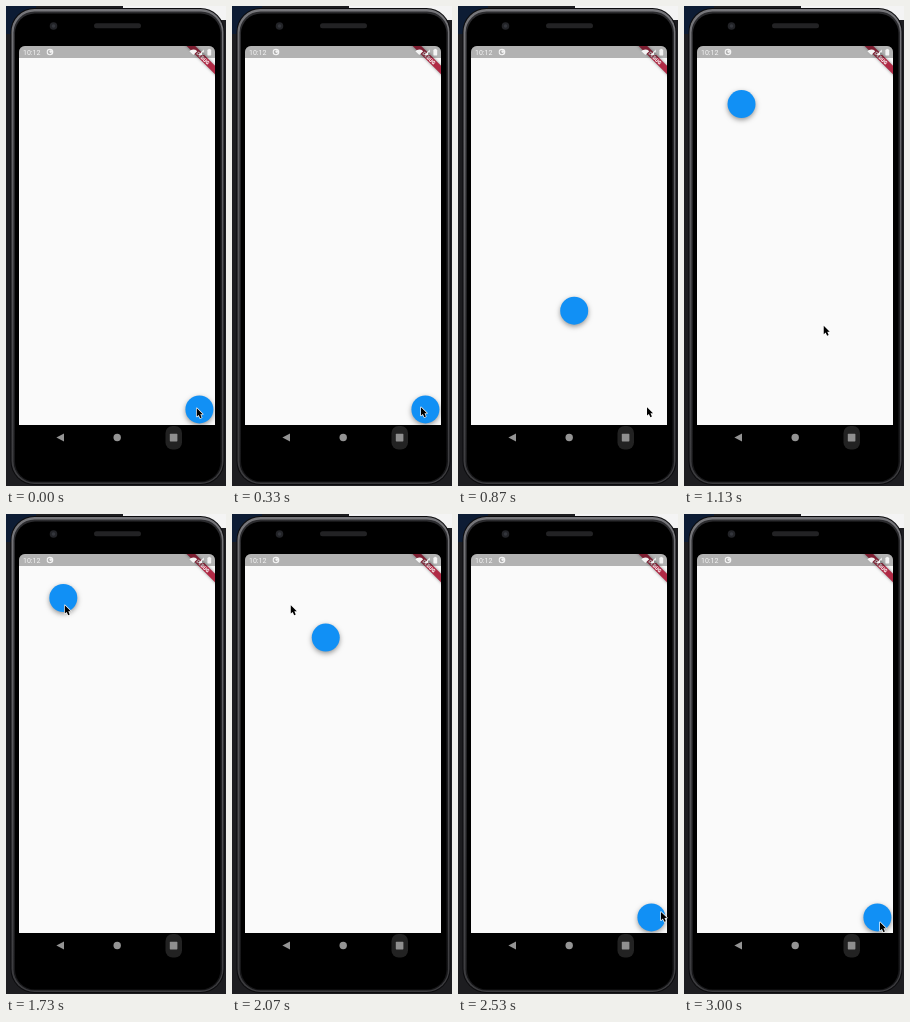
These frames come from a looping animation (220x480 px, 3.07 s). An HTML page with a canvas:

```html
<!DOCTYPE html>
<html lang="en">
<head>
<meta charset="utf-8">
<title>Moving button</title>
<style>
html, body { margin: 0; width: 100%; height: 100%; overflow: hidden; background: #000; }
canvas { display: block; width: 220px; height: 480px; }
</style>
</head>
<body>
<canvas id="stage" width="220" height="480"></canvas>
<script>
const ctx = document.getElementById('stage').getContext('2d');
const LOOP = 3070, TICK = 200 / 3;
const HOME = { x: 193.4, y: 403.4 }, AWAY = { x: 57.3, y: 84 };
const REST = { x: 190.3, y: 402 };

// Pointer moves, each from where the last one ended
const MOVES = [
  { start: 67, dur: 266, x: 188.5, y: 401, bend: 0 },
  { start: 1050, dur: 550, x: 58.3, y: 91, bend: 18 },
  { start: 2133, dur: 540, x: 212, y: 420, bend: 4 },
  { start: 2690, dur: 310, x: 195.5, y: 408, bend: 0 }
];

const progress = (ms, start, dur) => Math.min(1, Math.max(0, (ms - start) / dur));
const easeInOut = u => (1 - Math.cos(Math.PI * u)) / 2;
const easeOut = u => u * (2 - u);

// Circular arc that arrives at b vertically
function arc(a, b, t) {
  const dx = a.x - b.x, dy = a.y - b.y;
  const r = (dx * dx + dy * dy) / Math.abs(dx) / 2;
  const ang = Math.asin(Math.abs(dy) / r) * (1 - t);
  return {
    x: b.x + Math.sign(dx) * r * (1 - Math.cos(ang)),
    y: b.y + Math.sign(dy) * r * Math.sin(ang)
  };
}

function buttonAt(ms) {
  return ms < 1600
    ? arc(HOME, AWAY, easeInOut(progress(ms, 636, 570)))
    : arc(AWAY, HOME, easeInOut(progress(ms, 1910, 617)));
}

function pointerAt(ms) {
  let p = REST;
  for (const m of MOVES) {
    if (ms <= m.start) break;
    const e = easeOut(progress(ms, m.start, m.dur));
    const dx = m.x - p.x, dy = m.y - p.y;
    const side = m.bend * Math.sin(Math.PI * e) / Math.hypot(dx, dy);
    p = { x: p.x + dx * e + dy * side, y: p.y + dy * e - dx * side };
  }
  return p;
}

function rect(x, y, w, h, fill) {
  ctx.fillStyle = fill;
  ctx.fillRect(x, y, w, h);
}
function round(x, y, w, h, r, fill) {
  ctx.beginPath();
  ctx.roundRect(x, y, w, h, r);
  ctx.fillStyle = fill;
  ctx.fill();
}
function disc(x, y, r, fill) {
  ctx.beginPath();
  ctx.arc(x, y, r, 0, Math.PI * 2);
  ctx.fillStyle = fill;
  ctx.fill();
}
function poly(points, fill) {
  ctx.beginPath();
  points.forEach(p => ctx.lineTo(p[0], p[1]));
  ctx.closePath();
  ctx.fillStyle = fill;
  ctx.fill();
}
function fade(from, to) {
  const g = ctx.createLinearGradient(0, 0, 0, 480);
  g.addColorStop(0, from);
  g.addColorStop(1, to);
  return g;
}

function phone() {
  rect(0, 0, 220, 480, '#1d1d20');
  rect(0, 0, 30, 28, '#0d1c34');
  rect(117, 0, 103, 2, '#f4f4f4');
  rect(190, 0, 30, 14, '#f4f4f4');
  round(4.5, 2, 214, 477, 24, '#0b0b0d');
  round(5.5, 3, 212, 475, 23, fade('#77777b', '#3a3a3d'));
  round(7.5, 5.5, 208.5, 471, 21, fade('#2c2c2f', '#161618'));
  round(9, 7.5, 205.5, 468, 20, '#000');
  disc(47.5, 20, 3.8, '#222327');
  disc(47.5, 20, 1.8, '#34363c');
  round(88, 17.3, 47, 5, 2.5, '#222224');
}

function banner() {
  ctx.save();
  ctx.translate(209, 40);
  ctx.rotate(Math.PI / 4);
  ctx.shadowColor = 'rgba(0,0,0,.45)';
  ctx.shadowBlur = 3;
  rect(-40, 14, 80, 6, '#b02a45');
  ctx.shadowColor = 'transparent';
  ctx.fillStyle = '#fff';
  ctx.font = '900 5px Roboto, sans-serif';
  ctx.textAlign = 'center';
  ctx.fillText('DEBUG', 0, 18.8);
  ctx.restore();
}

function statusIcons() {
  const white = '#f4f4f4';
  ctx.fillStyle = white;
  ctx.font = '7px Roboto, sans-serif';
  ctx.textAlign = 'left';
  ctx.fillText('10:12', 17, 48.7);
  disc(44, 46, 3.3, white);
  disc(43.8, 46.1, 2.1, '#b0b0b0');
  disc(44.7, 45.6, 1.3, white);
  ctx.beginPath();
  ctx.moveTo(187.3, 49);
  ctx.arc(187.3, 49, 5.4, -Math.PI * .76, -Math.PI * .24);
  ctx.fillStyle = white;
  ctx.fill();
  poly([[192.5, 49], [197.8, 49], [197.8, 43.4]], white);
  rect(196, 46.5, 2, 2.5, '#8d8d8d');
  round(201.4, 43.6, 3.8, 5.8, .6, white);
  rect(202.4, 42.9, 1.8, 1, white);
}

function navBar() {
  round(159.5, 420, 16.5, 23.5, 7, '#222');
  poly([[50.4, 431.5], [58, 427.4], [58, 435.6]], '#949494');
  disc(111.2, 431.5, 3.7, '#949494');
  round(163.8, 427.8, 7.6, 7.6, .6, '#8f8f8f');
}

function screen() {
  ctx.save();
  ctx.beginPath();
  ctx.roundRect(13, 40, 196, 379, [6, 6, 0, 0]);
  ctx.clip();
  rect(13, 40, 196, 379, '#fafafa');
  banner();
  rect(13, 40, 196, 12, 'rgba(0,0,0,.29)');
  statusIcons();
  ctx.restore();
  navBar();
}

function button(ms) {
  const p = buttonAt(ms);
  ctx.save();
  ctx.shadowColor = 'rgba(0,0,0,.4)';
  ctx.shadowBlur = 5;
  ctx.shadowOffsetY = 2;
  disc(p.x, p.y, 14, '#1190f5');
  ctx.restore();
}

function pointer(ms) {
  const p = pointerAt(ms);
  ctx.save();
  ctx.translate(p.x, p.y);
  ctx.lineJoin = 'round';
  ctx.strokeStyle = '#fff';
  ctx.lineWidth = 1.3;
  const tip = [[.5, .3], [.5, 8.6], [2.4, 6.9], [3.9, 10.2], [5.4, 9.5], [4, 6.3], [6.5, 6.2]];
  poly(tip, '#000');
  ctx.stroke();
  poly(tip, '#000');
  ctx.restore();
}

// The picture advances in steps of 1/15 s
function draw(ms) {
  const t = Math.min(45, Math.floor((ms + 4) / TICK)) * TICK;
  phone();
  screen();
  button(t);
  pointer(t);
}

const start = performance.now();
function loop() {
  draw((performance.now() - start) % LOOP);
  requestAnimationFrame(loop);
}
loop();
</script>
</body>
</html>
```
